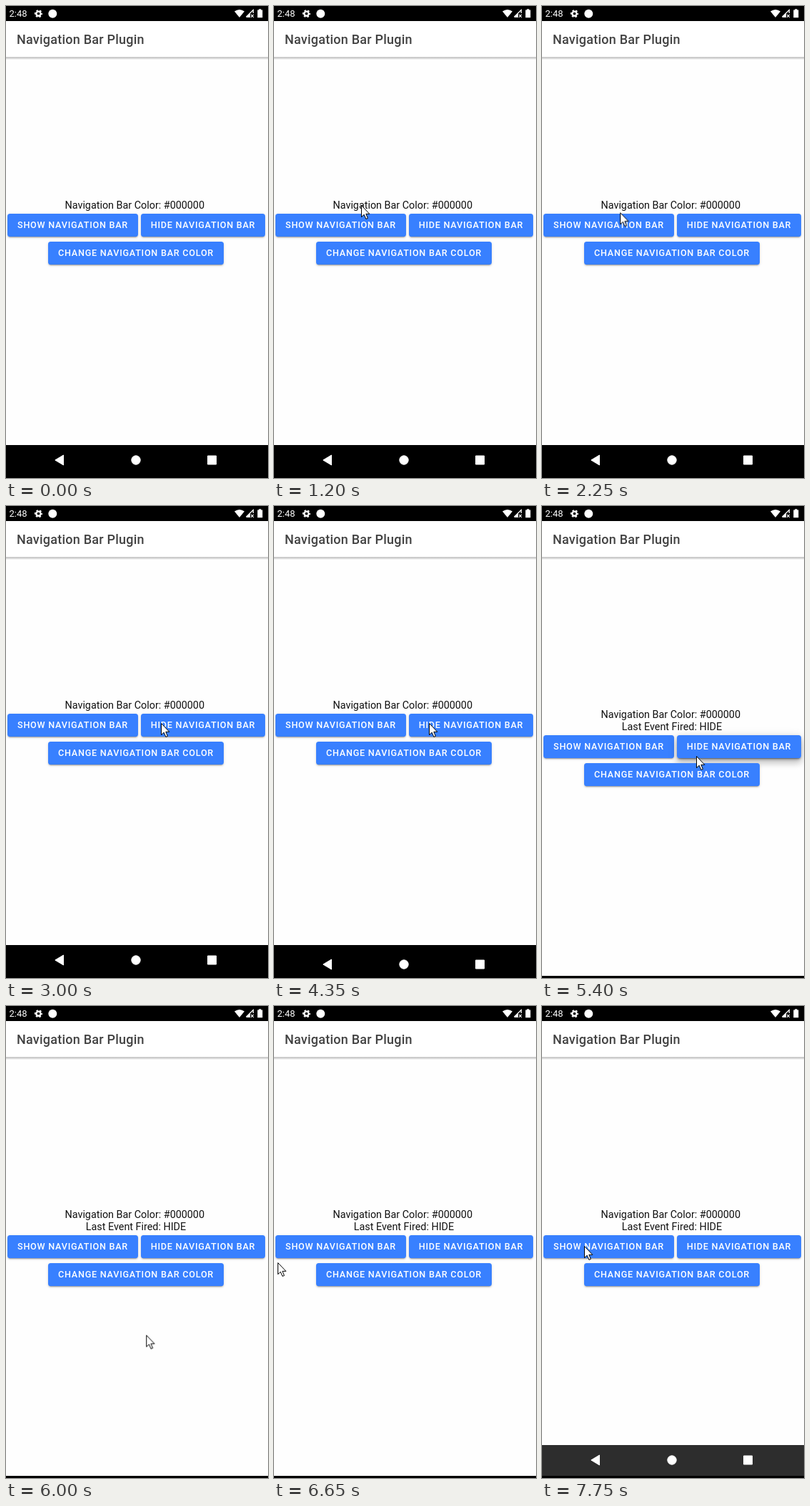
Recreate the animation shown at these times as an HTML page. Size 367 px wide and 659 px high, loop 8000 ms.

```html
<!DOCTYPE html>
<html lang="en">
<head>
<meta charset="utf-8">
<title>Navigation Bar Plugin</title>
<style>
  html, body { margin: 0; width: 100%; height: 100%; overflow: hidden; background: #000; }
  body { font-family: Roboto, sans-serif; }
  #stage { position: absolute; left: 0; top: 0; width: 367px; height: 659px; overflow: hidden; background: #000; }
  #stage * { position: absolute; white-space: pre; }
  #stage svg { left: 0; top: 0; }
  .anim { animation: 8s step-end infinite; }

  .clock { left: 4.5px; top: 3px; font-size: 13px; line-height: 16px; color: #fff; }

  .app { left: 0; top: 21px; width: 367px; height: 592px; background: #fefefe; animation-name: grow; }
  .header { left: 0; top: 0; width: 367px; height: 50px; background: #fff; }
  .header::after { content: ""; position: absolute; left: 0; top: 50px; width: 100%; height: 4px;
    background: linear-gradient(rgba(0,0,0,.18), rgba(0,0,0,.22) 30%, transparent); }
  .title { left: 15px; top: 15px; font-size: 18px; line-height: 21px; font-weight: 500;
    letter-spacing: .0125em; color: #424242; }

  .line { left: 82.5px; top: 270px; font-size: 14.35px; line-height: 17px; color: #111; animation-name: lineDown; }
  .event { left: 111.8px; top: 300px; animation-name: reveal; }

  .buttons { left: 0; top: 290px; animation-name: buttonsDown; }
  .btn { height: 32px; border-radius: 3.6px; background: #3880ff; color: #fff; text-align: center;
    font-size: 12.6px; line-height: 32px; font-weight: 500; letter-spacing: .06em;
    box-shadow: 0 2.7px .9px -1.8px rgba(0,0,0,.2), 0 1.8px 1.8px rgba(0,0,0,.14), 0 .9px 4.5px rgba(0,0,0,.12); }
  .show { left: 2px; top: 0; width: 183px; }
  .hide { left: 189px; top: 0; width: 174px; }
  .color { left: 59px; top: 39px; width: 246px; }
  .lift { left: 189px; top: 0; width: 174px; height: 32px; border-radius: 3.6px; opacity: 0; animation-name: lift;
    box-shadow: 0 4.5px 4.5px -2.7px rgba(0,0,0,.2), 0 7px 9px .9px rgba(0,0,0,.14), 0 2.7px 12.5px 1.8px rgba(0,0,0,.12); }

  .nav { left: 0; top: 613px; width: 367px; height: 43px; overflow: hidden; }
  .bar { left: 0; top: 0; width: 367px; height: 43px; background: #000; animation-name: slide; }
  #stage .pointer { overflow: visible; animation-name: move; }

  @keyframes grow { 58.75%, 100% { height: 635px; } }
  @keyframes lineDown { 65.625%, 100% { transform: translateY(13px); } }
  @keyframes buttonsDown { 65.625%, 100% { transform: translateY(30px); } }
  @keyframes reveal { 0% { opacity: 0; } 65.625%, 100% { opacity: 1; } }
  @keyframes lift {
    0% { opacity: 0; }
    65% { opacity: 0; animation-timing-function: steps(3); }
    66.875% { opacity: 1; }
    67.5% { opacity: 1; animation-timing-function: steps(5); }
    70.625%, 100% { opacity: 0; }
  }
  @keyframes slide {
    0% { transform: none; background: #000; }
    54.375% { transform: translateY(6px); }
    55% { transform: translateY(17px); }
    56.25% { transform: translateY(44px); }
    58.75% { background: #2d2d2d; }
    93.75% { transform: translateY(34px); }
    94.375% { transform: translateY(22px); }
    95% { transform: translateY(12px); }
    95.625% { transform: translateY(5px); }
    96.875%, 100% { transform: none; background: #2d2d2d; }
  }
  @keyframes move {
    0% { transform: translate(27px, 4px); opacity: 0; }
    3.125% { transform: translate(27px, 4px); opacity: 1; animation-timing-function: steps(2); }
    4.375% { transform: translate(62px, 95px); animation-timing-function: steps(2); }
    5.625% { transform: translate(100px, 200px); animation-timing-function: steps(2); }
    6.875% { transform: translate(122px, 258px); animation-timing-function: steps(2); }
    8.125% { transform: translate(130px, 276px); }
    15% { transform: translate(122px, 278px); }
    15.625% { transform: translate(122px, 278px); animation-timing-function: steps(6); }
    19.375% { transform: translate(100px, 301px); animation-timing-function: steps(6); }
    23.125% { transform: translate(89px, 290px); }
    27.5% { transform: translate(89px, 290px); animation-timing-function: steps(4); }
    30% { transform: translate(170px, 283px); animation-timing-function: steps(3); }
    31.875% { transform: translate(288px, 308px); animation-timing-function: steps(2); }
    33.125% { transform: translate(283px, 314px); }
    35.625% { transform: translate(283px, 314px); animation-timing-function: steps(3); }
    37.5% { transform: translate(217px, 303px); }
    65.625% { transform: translate(217px, 303px); animation-timing-function: steps(3); }
    67.5% { transform: translate(216px, 349px); animation-timing-function: steps(8); }
    72.5% { transform: translate(205px, 440px); animation-timing-function: steps(5); }
    75.625% { transform: translate(194px, 464px); }
    76.25% { transform: translate(194px, 464px); animation-timing-function: steps(6); }
    80% { transform: translate(60px, 425px); animation-timing-function: steps(3); }
    81.875% { transform: translate(1px, 385px); animation-timing-function: steps(2); }
    83.125% { transform: translate(5px, 358px); animation-timing-function: steps(3); }
    85%, 100% { transform: translate(59px, 335px); opacity: 1; }
  }
</style>
</head>
<body>
<div id="stage">
  <div class="clock">2:48</div>
  <svg width="367" height="21" fill="#fff">
    <circle cx="45.5" cy="10.7" r="3.1" fill="none" stroke="#fff" stroke-width="2.4"/>
    <circle cx="45.5" cy="10.7" r="4.8" fill="none" stroke="#fff" stroke-width="1.6" stroke-dasharray="2.6 2.43" stroke-dashoffset="1.3"/>
    <circle cx="65.3" cy="10.7" r="6"/>
    <path d="M320 7.6Q327 2.4 334 7.6L327 16Z"/>
    <path d="M336.5 15.3L346.3 5.5V10M336.5 15.3H342" fill="none" stroke="#fff" stroke-width="1.3"/>
    <path d="M336.5 15.3L342 9.8V15.3Z"/>
    <path d="M343 11.8l3.8 4m0-4l-3.8 4" stroke="#fff" stroke-width="1.1"/>
    <path d="M352.3 5.5h2v-1.3h3v1.3h2v10.7h-7z"/>
  </svg>

  <div class="app anim">
    <div class="header"><div class="title">Navigation Bar Plugin</div></div>
  </div>
  <div class="line anim">Navigation Bar Color: #000000</div>
  <div class="line event anim">Last Event Fired: HIDE</div>
  <div class="buttons anim">
    <div class="btn show">SHOW NAVIGATION BAR</div>
    <div class="lift anim"></div>
    <div class="btn hide">HIDE NAVIGATION BAR</div>
    <div class="btn color">CHANGE NAVIGATION BAR COLOR</div>
  </div>

  <div class="nav">
    <div class="bar anim">
      <svg width="367" height="43" fill="#fff" stroke="#fff" stroke-linejoin="round">
        <path d="M68.8 21L80.5 14V28Z"/>
        <circle cx="182" cy="21" r="6.2"/>
        <rect x="282.5" y="15" width="12" height="12"/>
      </svg>
    </div>
  </div>

  <svg class="pointer anim" width="13" height="21">
    <path d="M.5 .5V16.6L4.2 13.2L6.9 19.4L9.4 18.3L6.8 12.3H11.8Z" fill="#fff" stroke="#000"/>
  </svg>
</div>
</body>
</html>
```
